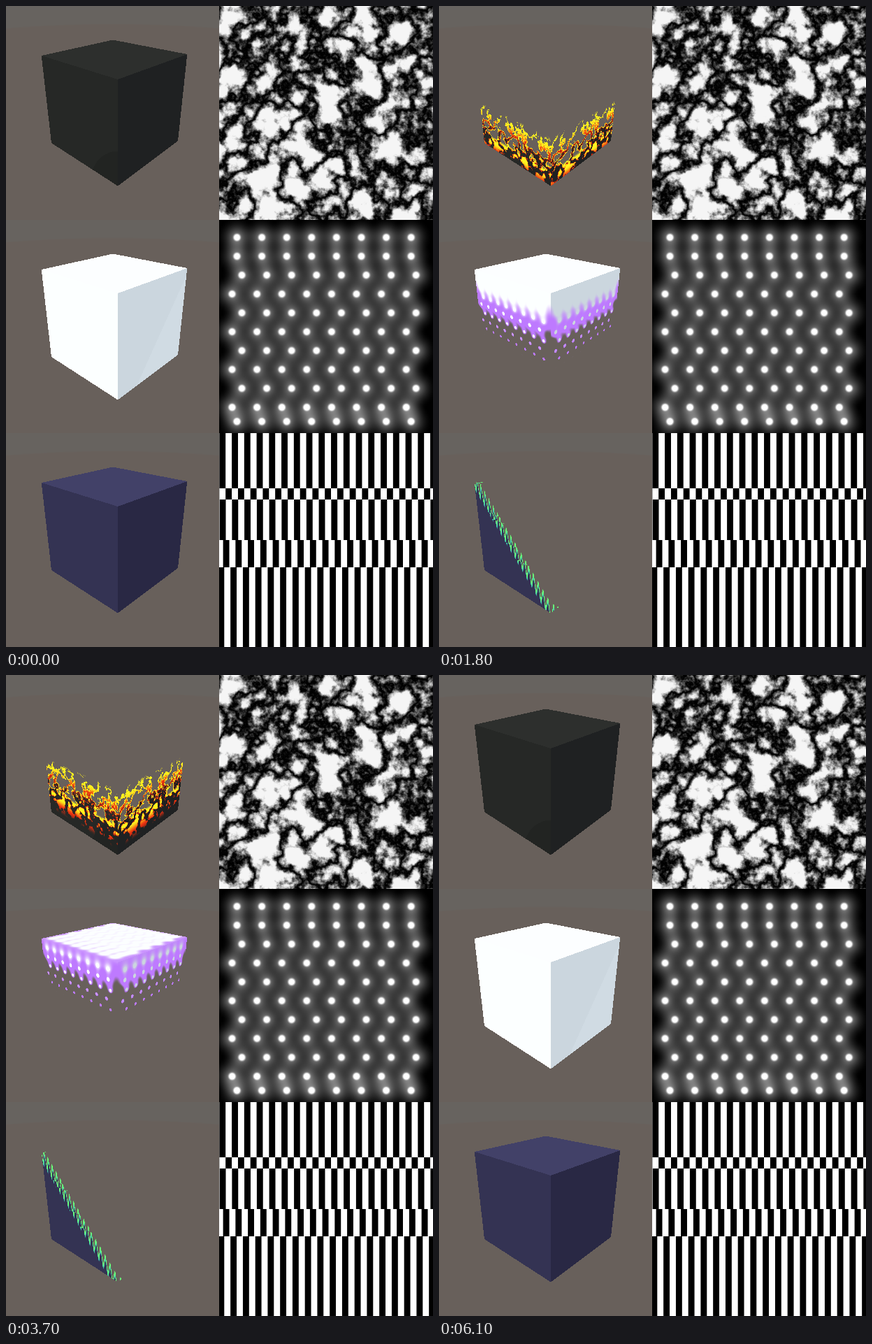
An HTML page with a canvas for the animation above (7200 ms loop, 611 px wide and 917 px high).

```html
<!DOCTYPE html>
<html lang="en">
<head>
<meta charset="utf-8">
<title>Dissolving cubes</title>
<style>
html, body { margin: 0; width: 100%; height: 100%; overflow: hidden; background: #68605b; }
canvas { display: block; }
</style>
</head>
<body>
<canvas id="stage" width="611" height="917"></canvas>
<script>
const W = 611, H = 917, PANEL_X = 305, CELL = 305.5;
const LOOP = 7200, STEP = 100, LAST_STEP = 61;
const ctx = document.getElementById('stage').getContext('2d');
const base = ctx.createImageData(W, H), picture = ctx.createImageData(W, H);

const clamp = v => Math.min(1, Math.max(0, v));
const lerp = (a, b, t) => a + (b - a) * t;
const smooth = (a, b, v) => { const t = clamp((v - a) / (b - a)); return t * t * (3 - 2 * t); };
const mix = (a, b, t) => a.map((v, i) => lerp(v, b[i], t));
const rowTop = row => Math.round(row * CELL);

function put(image, index, color) {
  for (let c = 0; c < 3; c++) image.data[index * 4 + c] = color[c];
  image.data[index * 4 + 3] = 255;
}

// ---- Textures, in a square of one cell ----
function hash(x, y) {
  const s = Math.sin(x * 127.1 + y * 311.7) * 43758.5453;
  return s - Math.floor(s);
}

function gradientNoise(x, y) {
  const ix = Math.floor(x), iy = Math.floor(y), fx = x - ix, fy = y - iy;
  const corner = (cx, cy) => {
    const angle = hash(ix + cx, iy + cy) * 2 * Math.PI;
    return Math.cos(angle) * (fx - cx) + Math.sin(angle) * (fy - cy);
  };
  const u = smooth(0, 1, fx), v = smooth(0, 1, fy);
  return lerp(lerp(corner(0, 0), corner(1, 0), u), lerp(corner(0, 1), corner(1, 1), u), v);
}

// Folding the noise at zero leaves dark veins between bright patches.
function clouds(x, y) {
  let sum = 0;
  for (let octave = 0; octave < 6; octave++) {
    const scale = 2 ** octave;
    sum += gradientNoise(x / 46 * scale + 17 * octave, y / 46 * scale + 31 * octave) / scale ** 0.9;
  }
  return 0.96 * smooth(0, 0.36, Math.abs(sum));
}

// Eleven rows of eight dots; the inner rows zigzag.
const DOTS = [];
for (let row = 0; row < 11; row++) {
  const sway = 7 * (-1) ** row * Math.min(1, Math.max(0, row - 1), 10 - row);
  for (let column = 0; column < 8; column++) {
    DOTS.push([25 + sway + 35.6 * column, Math.min(288, 24.5 + 27 * row)]);
  }
}

function dots(x, y) {
  let sum = 0;
  for (const [dx, dy] of DOTS) {
    const r = Math.hypot(x - dx, y - dy);
    if (r < 30) sum += 0.62 * (1 - r / 30) ** 2 + 0.6 * smooth(7, 2.5, r);
  }
  return clamp(sum);
}

// Lower edge and horizontal shift of each stripe band
const BANDS = [[79, 8.7], [95, -0.2], [153, 9], [192, 14], [H, 6.8]];

function stripes(x, y, contrast = 3) {
  const shift = BANDS.find(band => y < band[0])[1];
  return clamp(0.5 + contrast * Math.sin((x - shift) / 17.75 * 2 * Math.PI));
}

const softStripes = (x, y) => stripes(x, y, 0.6);

// ---- Cubes ----
const YELLOW = [255, 244, 30], RED = [238, 48, 16], PURPLE = [190, 122, 255];
const GREEN = [105, 255, 120], TEAL = [60, 190, 185];

// faces: colours of the left, right and top face
// tide:  dissolving rises to its peak at the apex (in seconds), then falls back
// depth: distance of a point from the dissolving edge, negative when gone
const CUBES = [
  {
    panel: clouds, texture: clouds,
    faces: [[38, 40, 38], [31, 33, 34], [45, 47, 45]],
    glint: (face, x, y) => face === 0 && Math.hypot(x - 160, y - 245) < 38 ? -4 : 0,
    tide: { apex: 2.55, peak: 1.16, rise: 0.65, fall: 0.56, bend: 1 },
    depth: (p, level) => 1 - p.height + 0.36 * (0.5 - p.sample) - level,
    color: (d, body) => mix(mix(YELLOW, RED, smooth(0.08, 0.18, d)), body, smooth(0.16, 0.27, d)),
    softness: 0.04
  },
  {
    panel: dots, texture: dots,
    faces: [[252, 255, 255], [203, 214, 222], [252, 254, 255]],
    glint: (face, x, y) => face === 1 && x > 186 + (238 - y) * 0.45 ? 5 : 0,
    tide: { apex: 2.89, peak: 1.22, rise: 0.52, fall: 0.48, bend: 1 },
    depth: (p, level) => p.height + 0.35 * p.sample - level,
    color: (d, body) => mix(PURPLE, body, smooth(0.13, 0.27, d)),
    softness: 0.06
  },
  {
    panel: stripes, texture: softStripes,
    faces: [[52, 51, 83], [41, 40, 68], [66, 65, 104]],
    glint: () => 0,
    tide: { apex: 2.75, peak: 2.88, rise: 0.93, fall: 0.88, bend: 1.15 },
    depth: (p, level) => 3 - p.diagonal + 0.12 * p.sample - level,
    color: (d, body) => mix(mix(GREEN, TEAL, smooth(0.03, 0.08, d)), body, smooth(0.065, 0.09, d)),
    softness: 0.015
  }
];

function tideLevel({ apex, peak, rise, fall, bend }, seconds) {
  return peak - (seconds < apex ? rise : fall) * Math.abs(seconds - apex) ** bend;
}

const TOP_L = [50.7, 71], TOP_F = [160, 105], TOP_R = [259.3, 69], TOP_B = [153, 48.5];
const LOW_L = [65, 196], LOW_F = [160, 257.5], LOW_R = [246, 193];
const FACES = [
  { quad: [TOP_L, TOP_F, LOW_F, LOW_L], place: (u, v) => [u, 0, 1 - v] },
  { quad: [TOP_F, TOP_R, LOW_R, LOW_F], place: (u, v) => [1, u, 1 - v] },
  { quad: [TOP_L, TOP_F, TOP_R, TOP_B], place: (u, v) => [u, v, 1] }
];

// Returns a function from screen point to face coordinates, with perspective.
function unproject([[ax, ay], [bx, by], [cx, cy], [dx, dy]]) {
  const x1 = bx - cx, y1 = by - cy, x2 = dx - cx, y2 = dy - cy;
  const sx = ax - bx + cx - dx, sy = ay - by + cy - dy, den = x1 * y2 - x2 * y1;
  const g = (sx * y2 - x2 * sy) / den, h = (x1 * sy - sx * y1) / den;
  return (x, y) => {
    const a = bx - ax + g * (bx - x), b = dx - ax + h * (dx - x);
    const c = by - ay + g * (by - y), d = dy - ay + h * (dy - y);
    const det = a * d - b * c;
    return [((x - ax) * d - b * (y - ay)) / det, (a * (y - ay) - c * (x - ax)) / det];
  };
}

function facePixels(cube, row) {
  const pixels = [];
  FACES.forEach(({ quad, place }, face) => {
    const toFace = unproject(quad);
    for (let y = 48; y < 259; y++) {
      for (let x = 50; x < 260; x++) {
        const [u, v] = toFace(x + 0.5, y + 0.5);
        if (u < 0 || v < 0 || u >= 1 || v >= 1) continue;
        const [a, b, height] = place(u, v);
        pixels.push({
          index: (y + rowTop(row)) * W + x,
          height,
          diagonal: a + b + height,
          sample: cube.texture(u * CELL, v * CELL),
          body: cube.faces[face].map(c => c + cube.glint(face, x, y))
        });
      }
    }
  });
  return pixels;
}

function drawBase() {
  CUBES.forEach(({ panel }, row) => {
    for (let y = rowTop(row); y < rowTop(row + 1); y++) {
      const py = y - rowTop(row);
      for (let x = 0; x < W; x++) {
        let color;
        if (x < PANEL_X) {
          const horizon = 25 + 6 * ((x - 152) / 152) ** 2;
          color = mix([103, 99, 95], [104, 96, 91], smooth(horizon - 1, horizon + 2, py));
        } else {
          color = Array(3).fill(255 * panel(x - PANEL_X, py));
        }
        put(base, y * W + x, color);
      }
    }
  });
}

function drawCube(cube, seconds) {
  const level = tideLevel(cube.tide, seconds);
  for (const p of cube.pixels) {
    const d = cube.depth(p, level);
    if (d <= 0) continue;
    const color = cube.color(d, p.body), alpha = smooth(0, cube.softness, d);
    put(picture, p.index, color.map((c, k) => lerp(base.data[p.index * 4 + k], c, alpha)));
  }
}

drawBase();
CUBES.forEach((cube, row) => { cube.pixels = facePixels(cube, row); });

const start = performance.now();
let shown = -1;

function frame() {
  const elapsed = Math.max(0, performance.now() - start) % LOOP;
  const step = Math.min(LAST_STEP, Math.floor(elapsed / STEP));
  if (step !== shown) {
    shown = step;
    picture.data.set(base.data);
    for (const cube of CUBES) drawCube(cube, step * STEP / 1000);
    ctx.putImageData(picture, 0, 0);
  }
  requestAnimationFrame(frame);
}
frame();
</script>
</body>
</html>
```
